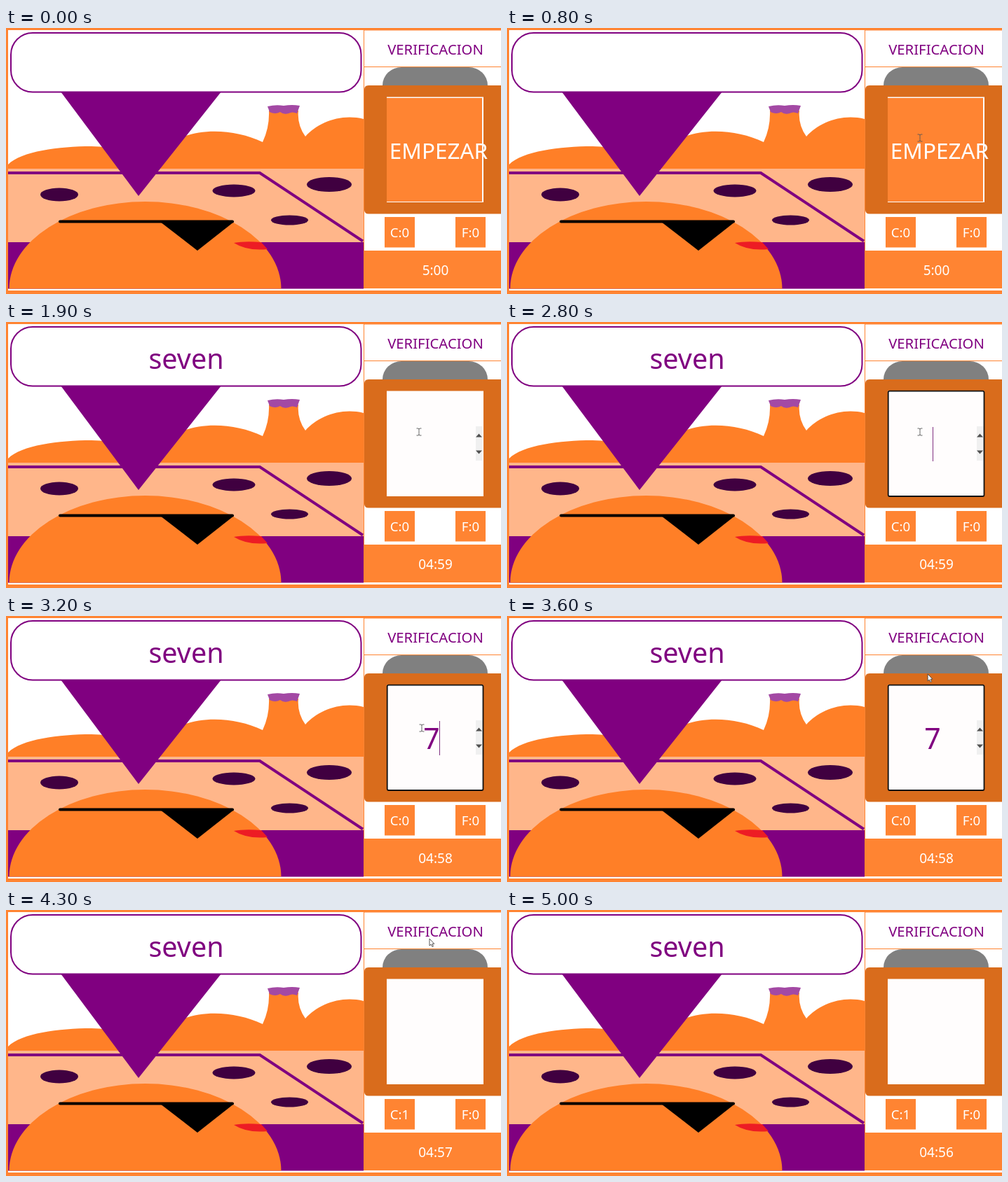
Animation, 706 px wide and 380 px high, one loop 5.8 s. Source, as an HTML page:

```html
<!DOCTYPE html>
<html lang="es">
<head>
<meta charset="utf-8">
<title>Verificacion</title>
<style>
  html, body { margin: 0; width: 100%; height: 100%; overflow: hidden; background: #fff; }
  svg { display: block; width: 706px; height: 380px; }
  text { font-family: 'Noto Sans', 'Open Sans', sans-serif; font-weight: 500; text-anchor: middle; }
  .purple { fill: #800080; }
  .skin { fill: #ff7f27; }
  .panel { fill: #ff8432; }
  .white { fill: #fff; }
</style>
</head>
<body>
<svg viewBox="0 0 706 380">
  <rect class="panel" width="706" height="380"/>
  <rect class="white" x="3" y="3" width="507" height="370"/>
  <rect class="white" x="3" y="372" width="703" height="3"/>

  <!-- hills and volcano -->
  <path class="skin" d="M3 202V195C22 176 75 169 122 169Q170 170 200 190L236 164C268 142 325 143 366 163Q376 142 375 118H417Q415 138 427 155C445 135 477 122 510 130V202Z"/>
  <path fill="#a349a4" d="M373 112Q385 109 396 111Q408 109 419 111L415 122Q408 119 403 122Q396 124 391 120Q384 124 376 120Z"/>

  <!-- table -->
  <rect x="3" y="201" width="507" height="105" fill="#ffb68a"/>
  <rect class="purple" x="3" y="306" width="507" height="66.500"/>
  <path d="M3 207H362L509 304.500" fill="none" stroke="#800080" stroke-width="4"/>
  <g fill="#400040">
    <ellipse cx="76" cy="238" rx="27" ry="9.500"/>
    <ellipse cx="325" cy="232.500" rx="30.500" ry="9"/>
    <ellipse cx="461" cy="223.500" rx="32" ry="10.500"/>
    <ellipse cx="404.500" cy="274.500" rx="26.500" ry="7"/>
  </g>

  <!-- head -->
  <path class="skin" d="M4.500 372.500A194 124.500 0 0 1 392.500 372.500Z"/>
  <path d="M77 276.500H323" stroke="#000" stroke-width="4" stroke-linecap="round"/>
  <path d="M220 277H325L273 318Z"/>
  <path fill="#ed1c24" d="M325 307Q340 304 364 306L373 316Q344 319 325 307Z"/>

  <!-- speech bubble -->
  <path class="purple" d="M78 91H307L189 240Z"/>
  <rect class="white" x="7" y="7" width="499.500" height="84.500" rx="31" stroke="#800080" stroke-width="2"/>
  <text id="word" class="purple" x="257" y="67" font-size="39.500">seven</text>

  <!-- side panel -->
  <rect class="white" x="511" y="3.500" width="195" height="51.500"/>
  <rect class="white" x="511" y="56" width="195" height="262"/>
  <text class="purple" x="612.500" y="37.500" font-size="20.300">VERIFICACION</text>
  <path fill="#808080" d="M537 83V82A27 26 0 0 1 564 56H660A27 26 0 0 1 687 82V83Z"/>
  <path fill="#d96c1c" d="M517 82H706V265.500H517Q511 265.500 511 259.500V88Q511 82 517 82Z"/>
  <rect fill="#fffdfd" x="543" y="98.500" width="138" height="150.500"/>

  <g id="spin">
    <rect x="670" y="149" width="9.500" height="49" fill="#f0f0f0"/>
    <path fill="#505050" d="M670 164.500L674.500 159.500L679 164.500ZM670 183.500H679L674.500 188.500Z"/>
  </g>
  <rect id="focus" x="543.700" y="98.700" width="136.800" height="150.300" rx="2" fill="none" stroke="#101010" stroke-width="1.800"/>
  <text id="digit" class="purple" x="607" y="190" font-size="41">7</text>
  <path id="caret" d="M618.500 150V199" stroke="#803080"/>
  <g id="start">
    <rect class="panel" x="543" y="100" width="136" height="148"/>
    <text class="white" x="617" y="187" font-size="31.500">EMPEZAR</text>
  </g>

  <rect class="panel" x="540" y="270" width="43" height="43.500"/>
  <rect class="panel" x="641" y="270" width="43" height="43.500"/>
  <g class="white" font-size="18.700">
    <text id="hits" x="561.500" y="299"></text>
    <text x="662.500" y="299">F:0</text>
    <text id="clock" x="612.500" y="352.500" font-size="19"></text>
  </g>

  <g id="mouse">
    <path id="beam" d="M-3.500 -5H-1L0 -4L1 -5H3.500M0 -4V4M-3.500 5H-1L0 4L1 5H3.500" fill="none" stroke="#555" stroke-width=".9"/>
    <path id="arrow" d="M0 0V10L2.300 8L4 11.500L5.500 10.800L4 7.300H6.800Z" fill="#fff" stroke="#444" stroke-width=".9"/>
  </g>
</svg>
<script>
const LOOP = 5800, STEP = 100;
const $ = id => document.getElementById(id);
const show = (id, on) => $(id).setAttribute('visibility', on ? 'visible' : 'hidden');
const within = (t, a, b) => t >= a && t < b;

// pointer path: time, x, y
const path = [
  [500, 672, 281], [800, 589, 157], [2800, 589, 157], [3000, 593, 160],
  [3300, 593, 160], [3800, 604, 41], [4400, 604, 41], [4700, 680, 31]
];

function pointer(t) {
  const i = Math.max(1, path.findIndex(p => p[0] > t));
  const [a, b] = [path[i - 1], path[i]];
  const k = (t - a[0]) / (b[0] - a[0]);
  const e = k * k * (3 - 2 * k);
  return [a[1] + (b[1] - a[1]) * e, a[2] + (b[2] - a[2]) * e];
}

function clockText(t) {
  const gone = [1900, 2900, 3900, 5000].filter(s => t >= s).length;
  return gone ? '04:' + (60 - gone) : '5:00';
}

function draw(ms) {
  const t = Math.floor(ms % LOOP / STEP) * STEP;
  const typed = t >= 3100;
  show('start', t < 1000);
  show('word', t >= 1000);
  show('spin', within(t, 1000, 4100));
  show('focus', within(t, 2800, 4100));
  show('digit', within(t, 3100, 4300));
  show('caret', within(t, 2800, 4100) && (t - (typed ? 3100 : 2800)) % 1000 < 500);
  $('caret').setAttribute('transform', `translate(${typed ? 0 : -11})`);
  $('hits').textContent = t < 4300 ? 'C:0' : 'C:1';
  $('clock').textContent = clockText(t);

  const active = within(t, 500, 4700);
  const [x, y] = active ? pointer(t) : [0, 0];
  const inField = within(x, 543, 681) && within(y, 99, 249);
  show('beam', active && inField);
  show('arrow', active && !inField);
  $('mouse').setAttribute('transform', `translate(${x.toFixed(1)} ${y.toFixed(1)})`);
}

const t0 = performance.now();
function tick() {
  draw(performance.now() - t0);
  requestAnimationFrame(tick);
}
draw(0);
requestAnimationFrame(tick);
</script>
</body>
</html>
```
